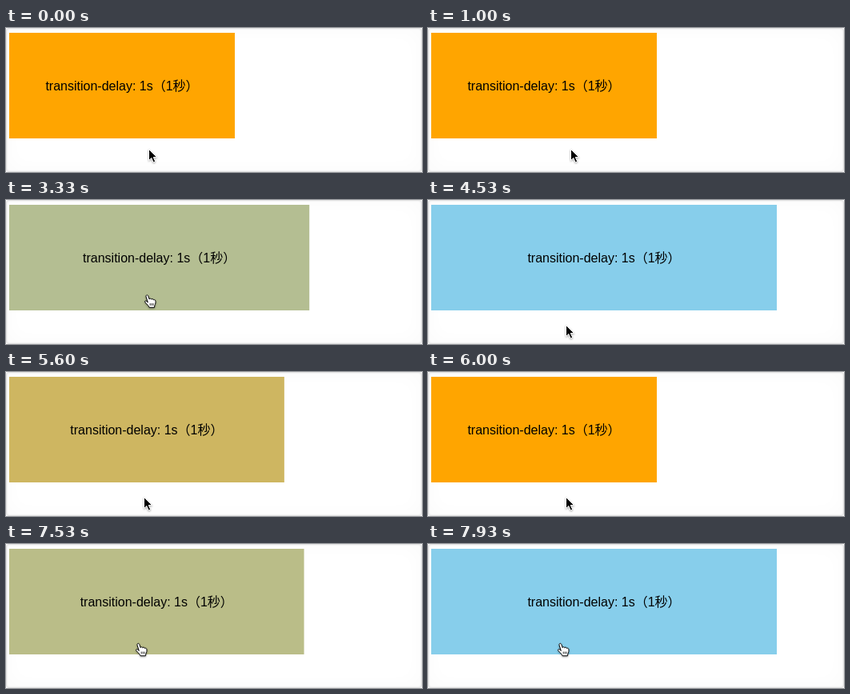
Write an HTML page that moves like this. It is 520 px wide and 180 px high and loops after 8000 ms.

```html
<!DOCTYPE html>
<html lang="ja">
<head>
<meta charset="utf-8">
<title>transition-delay</title>
<style>
html, body { margin: 0; width: 100%; height: 100%; overflow: hidden; background: #fff; }
#stage {
  position: relative; box-sizing: border-box; width: 520px; height: 180px;
  border: 1px solid #e2e2e2; border-radius: 3px;
  box-shadow: inset 0 0 2px #ddd, inset 0 0 26px rgba(0, 0, 0, .025);
}
svg { position: absolute; left: 0; top: 0; display: block; }
text { font: 16px "Liberation Sans", "Noto Sans CJK JP", sans-serif; text-anchor: middle; }
#cursor { filter: drop-shadow(0 1px 1px rgba(0, 0, 0, .35)); }
</style>
</head>
<body>
<div id="stage"></div>
<svg width="520" height="180" viewBox="0 0 520 180">
  <rect id="box" x="4" y="6" height="132"/>
  <text id="label" y="78">transition-delay: 1s（1秒）</text>
  <g id="cursor">
    <path id="arrow" d="M.5 .5V14.6l3.3-3.1 2.4 5.5 2.5-1.1-2.4-5.3h4.4z" stroke="#fff"/>
    <g id="hand" transform="translate(-5.5 -1.5)" fill="#fff" stroke="#000" stroke-linejoin="round">
      <path d="M5.8 10.5L3.6 3.6C3 1.2 5.6 .4 6.3 2.6L7.7 6.6C8 5.2 10 5.3 10.3 6.8C10.9 5.7 12.6 6 12.9 7.4C13.8 6.7 15.2 7.3 15.4 8.6C15.8 10.8 15.2 12.6 14.4 14.2L14 16.8H7.6C7 14.8 4.6 13 2.6 10.6C1.2 9 2.8 7.9 4.2 9Z"/>
      <path d="M8.7 11.6v2.8M10.7 11.6v2.8M12.6 11.6v2.8" stroke-width=".8"/>
    </g>
  </g>
</svg>
<script>
const LOOP = 8000, DURATION = 500, BOX_BOTTOM = 138;
const ORANGE = [255, 165, 0], SKY = [135, 206, 235];
const [box, label, cursor, arrow, hand] =
  ['box', 'label', 'cursor', 'arrow', 'hand'].map(id => document.getElementById(id));

// Cursor moves: start, end, target x, target y
const REST = [178, 151];
const MOVES = [
  [1970, 2330, 177, 119],
  [4290, 4530, 172, 156],
  [6245, 6530, 166, 124.5]
];
// Transition starts: one second after each enter, leave, enter
const GROW = [3150, 7363], SHRINK = [5430];

const clamp = v => Math.min(1, Math.max(0, v));
const mix = (a, b, p) => a + (b - a) * p;
const smooth = p => p * p * (3 - 2 * p);

// CSS "ease": cubic-bezier(.25, .1, .25, 1)
function ease(x) {
  const bezier = (a, b, u) => 3 * a * u * (1 - u) ** 2 + 3 * b * u * u * (1 - u) + u ** 3;
  let lo = 0, hi = 1;
  for (let i = 0; i < 24; i++) {
    const mid = (lo + hi) / 2;
    if (bezier(.25, .25, mid) < x) lo = mid; else hi = mid;
  }
  return x <= 0 ? 0 : x >= 1 ? 1 : bezier(.1, 1, lo);
}

function draw(t) {
  const step = start => ease(clamp((t - start) / DURATION));
  const sum = starts => starts.reduce((total, start) => total + step(start), 0);
  const p = sum(GROW) - sum(SHRINK);
  const width = mix(282, 432, p);
  box.setAttribute('width', width);
  box.setAttribute('fill', `rgb(${ORANGE.map((c, i) => Math.round(mix(c, SKY[i], p)))})`);
  label.setAttribute('x', 4 + width / 2);

  let [x, y] = REST;
  for (const [start, end, toX, toY] of MOVES) {
    const q = smooth(clamp((t - start) / (end - start)));
    x = mix(x, toX, q);
    y = mix(y, toY, q);
  }
  const hover = y < BOX_BOTTOM;
  cursor.setAttribute('transform', `translate(${x} ${y})`);
  arrow.style.display = hover ? 'none' : '';
  hand.style.display = hover ? '' : 'none';
}

let origin;
function frame(now) {
  origin ??= now;
  draw((now - origin) % LOOP);
  requestAnimationFrame(frame);
}
draw(0);
requestAnimationFrame(frame);
</script>
</body>
</html>
```
